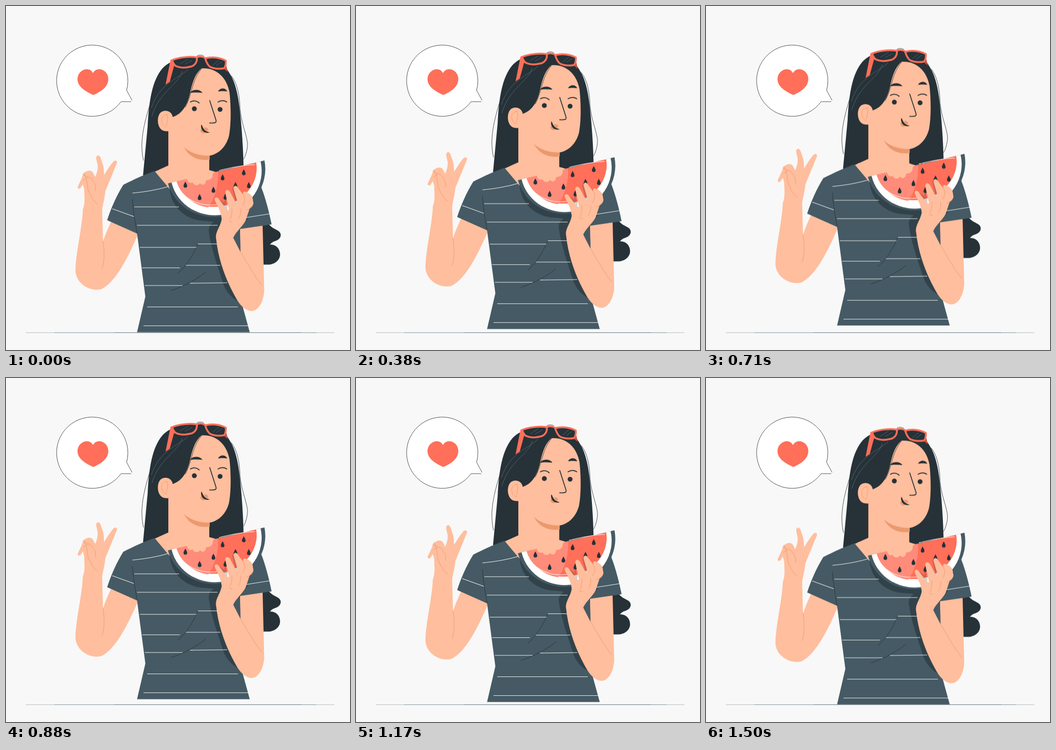
Animation, 748 px wide and 748 px high, one loop 1540 ms. Source, as an HTML page:

```html
<!DOCTYPE html>
<html lang="en">
<head>
<meta charset="utf-8">
<title>Watermelon</title>
<style>
html, body { margin: 0; width: 100%; height: 100%; overflow: hidden; background: #f8f8f8; }
svg { display: block; width: 100vw; height: 100vh; }
.skin { fill: #ffbe9d; }
.tan { fill: #eb996e; }
.ink { fill: #263238; }
.cloth { fill: #455a64; }
.shade { fill: #32424a; }
.red { fill: #ff6f59; }
.white { fill: #fff; }
.line { fill: none; stroke: #263238; stroke-width: .9; stroke-linecap: round; }
.bold { stroke-width: 1.9; }
.crease { fill: none; stroke: #eb996e; stroke-width: .9; stroke-linecap: round; }
.gloss { fill: none; stroke: #5f757f; stroke-width: .8; }
.stripe { fill: none; stroke: #fff; stroke-width: 1.1; }
.frame { fill: #263238; stroke: #ff6f59; stroke-width: 4; stroke-linejoin: round; }
.ground { fill: none; stroke: #455a64; stroke-width: .7; stroke-opacity: .6; }
</style>
</head>
<body>
<svg viewBox="0 0 748 748">
  <defs>
    <path id="seed" class="ink" d="M0-7C2-3 4 0 4 2.2A4 4 0 0 1-4 2.2C-4 0-2-3 0-7Z"/>
  </defs>

  <path class="ground" d="M43 710.3H714M105 710.3H675M235 710.3H642"/>

  <!-- speech bubble -->
  <path class="white" d="M262.2 183.1A77.5 77.5 0 1 0 250.2 208L276 208Z"/>
  <path class="line" d="M272 208H250.2A77.5 77.5 0 1 1 262.2 183.1L274 205"/>
  <path class="red" d="M190 193.5C168 184 155.500 173 155.5 159C156 138 182 130 189 146C197 130 222 138 222.5 158C222.5 173 212 184 190 193.5Z"/>

  <g id="girl">
    <!-- hair -->
    <path class="ink" d="M555 474H571C576 481 583 484 590 488C600 493 599 503 592 508C587 512 580 511 574 519C586 518 596 527 596 541C595 555 582 562.5 570 562.5H555Z"/>
    <path class="ink" d="M298 368L308 262C311 205 318 162 340 136C356 119 380 112 420 112C455 111 476 126 487 148C500 168 506 200 509 232C513 270 516 310 517 364Z"/>
    <path class="line" d="M315 208C299 258 290 298 299 336M490 152C503 168 508 195 509 225C512 255 522 276 525 297C526 311 521 325 517 333"/>
    <path class="gloss" d="M396 138C372 160 334 168 316 222M383 142C377 170 334 184 317 240"/>

    <!-- left arm -->
    <path class="skin" d="M167 443C173 428 170 412 170 398L167 388L162 396C159 399 155 397 156 393L163 378C165 374 166 370 167 367C171 360 182 355 188 361C191 365 192 369 194 372C199 360 201 350 198 341L196 331C196 324 203 322 206 331L211 346C213 353 213 360 213 368C220 357 227 346 233 339C237 334 243 336 241 342L216 403C215 417 211 430 209 443L211 512C216 497 222 483 230 466L290 490C266 545 240 600 207 616C178 622 151 600 151 575C152 535 166 480 167 443Z"/>
    <path class="crease" d="M211 512C214 532 215 555 209 571M167 366C176 374 184 370 190 382C195 389 196 395 194 401M169 363C180 380 174 395 182 408C187 419 192 426 199 431M168 379L178 373"/>

    <!-- face and neck -->
    <path class="skin" d="M425 136C455 133 480 154 486 188C489 215 490 255 485 282C479 306 463 322 442 326V357L456 361V405H362L322 361L353 347V270L361 242C386 235 396 210 401 186C406 163 413 146 425 136Z"/>
    <path class="skin" d="M362 239C358 227 344 225 336 232C328 240 328 261 338 269C343 273 350 273 356 272L364 260Z"/>
    <path class="crease" d="M352 236C340 236 336 246 340 255C341 260 345 263 349 263M349 237C355 242 350 250 349 260"/>
    <path class="tan" d="M387 307C400 320 423 326 443 325.5V334C420 338 398 329 387 307Z"/>
    <path class="line" d="M425 137C403 163 406 190 390 220"/>
    <path class="ink" d="M400 189C405 181 421 180 427 189C418 188 409 188 400 189ZM461 186C465 178 477 177 481 186C475 185 467 185 461 186Z"/>
    <path class="line bold" d="M401 209C407 205 415 206 420 211M461 209C467 205 475 205 480 209"/>
    <circle class="ink" cx="409.5" cy="223.5" r="5.3"/>
    <circle class="ink" cx="465.5" cy="225" r="5.3"/>
    <path class="line bold" d="M443 206L456.5 248C458 254 456 255 443 254.500"/>
    <path class="tan" d="M422 270C424 277 430 279 434 275L428 267ZM430 265C434 263 439 266 440 269L436 273Z"/>
    <path class="ink" d="M424.5 258.5C422 270 432 279 443 275C435 273.500 429 269 426 259Z"/>

    <!-- sunglasses -->
    <path class="line" d="M415 109C419 106 426 106 430 109"/>
    <path class="red" d="M358 116L367 125L356 165L347 171Z"/>
    <path d="M477 119L482 144L473 136Z" fill="#c94e3b"/>
    <path class="frame" d="M361 118C375 112 400 109 415 112C416 123 410 131 399 132.5C385 136 374 133 368 130C364 126 363 122 361 118Z"/>
    <path class="frame" d="M433 114C450 110 466 113 478 119C478.5 126 478 131 474 135.5C463 138 450 136 443 132C437 127 435 120 433 114Z"/>
    <path d="M414 112C420 109.5 428 109.5 434 114" fill="none" stroke="#ff6f59" stroke-width="4"/>
    <path class="gloss" d="M379 126L397 115M389 127L405 118M449 129L463 118M457 130L470 121"/>

    <!-- shirt -->
    <path class="cloth" d="M323 359L360 403L455 440L555 394C565 420 572 448 577.5 475L509 486L515 655L530 709.5H285L303 632L285 495L220 466C228 441 240 413 255 389C279 377 300 367 323 359Z"/>
    <path class="shade" d="M355 392C358 438 390 463 425 467C437 468 446 468 452 470C442 476 439 484 442 496C447 532 462 570 470 597C477 622 492 637 510 645L505 560L488 500L509 485L526 462L470 440Z"/>
    <path class="stripe" d="M275 407Q318 403 352 393M231 441L278 458M279 437H376M285 477H460M291 525H415M417 517.5H460M296 569.5H378M391 564H466M302 608H384M400 603L481 602M307 654.5H504M299 695.5H528M523 460L574 452"/>
    <path class="line" d="M417 518C404 548 389 569 374 581M434 579C415 595 386 610 359 619M275 421C276 445 281 470 285 494"/>

    <!-- right arm -->
    <path class="skin" d="M509 485L558 478L561.5 620C559 648 547 663.5 533 663.5C519 662 508 650 500 635C480 600 462 555 457 507L468 470L521 466C515 480 502 488 494 504L510 535Z"/>
    <path class="crease" d="M510 535C525 560 542 590 556 607"/>

    <!-- melon -->
    <path class="cloth" d="M352 386A108 101 -13.4 0 0 562 336Z"/>
    <path class="white" d="M360 384A99 93.5 -13.4 0 0 553.5 338Z"/>
    <path class="red" d="M371 381.5A89 79 -13.4 0 0 544 340.500Z"/>
    <path d="M371 381.5C382 412 408 434 440 438C454 418 463 390 461 360Z" fill="#ff8b7a"/>
    <path class="skin" d="M393 374C394 384 401 387 406 384C410 393 420 390 422 385C426 392 435 389 435 379C444 380 451 373 449 367L453 360L420 360Z"/>
    <path class="stripe" d="M378 400C399 430 436 438 470 430M463 358C490 351 518 346 541 345"/>
    <use href="#seed" x="390" y="389"/>
    <use href="#seed" x="421" y="416"/>
    <use href="#seed" x="451" y="400"/>
    <use href="#seed" x="471" y="373"/>
    <use href="#seed" x="517" y="362"/>
    <use href="#seed" x="528" y="390"/>
    <use href="#seed" x="499" y="390"/>
    <use href="#seed" x="477" y="415"/>

    <!-- right hand -->
    <path d="M492 397L496 390L505 428L499 427ZM476 408L480 438L475 430ZM463 420L482 433L481 446ZM487 432L501 427L504 440L489 448Z" fill="#263238" opacity=".22"/>
    <path class="skin" d="M457 507C454 492 466 481 469 464C468 446 458 433 454 422C453 415 460 415 463 420L480 443L485 444L477 407C476 399 483 398 487 404L499 427L504 428L495 398C494 390 501 389 504 395L516 411C514 403 519 402 525 406C533 409 537 416 537 424C540 431 536 436 530 440L521 467C514 480 501 488 494 504Z"/>
    <path class="crease" d="M491 441C492 450 490 459 487 465M510 441C512 449 509 457 505 463M516 411C522 420 519 428 514 435M523 444C528 442 534 440 536 434M486 468L492 470"/>
  </g>
</svg>
<script>
// Slow lift-off, then nearly steady rise; the way down mirrors it
const loop = 1540, lead = 50;
document.getElementById('girl').animate(
  { transform: ['translateY(.5px)', 'translateY(-14.8px)'] },
  {
    duration: loop / 2,
    delay: -lead,
    direction: 'alternate',
    iterations: Infinity,
    easing: 'cubic-bezier(.33, .23, .67, .62)'
  }
);
</script>
</body>
</html>
```
